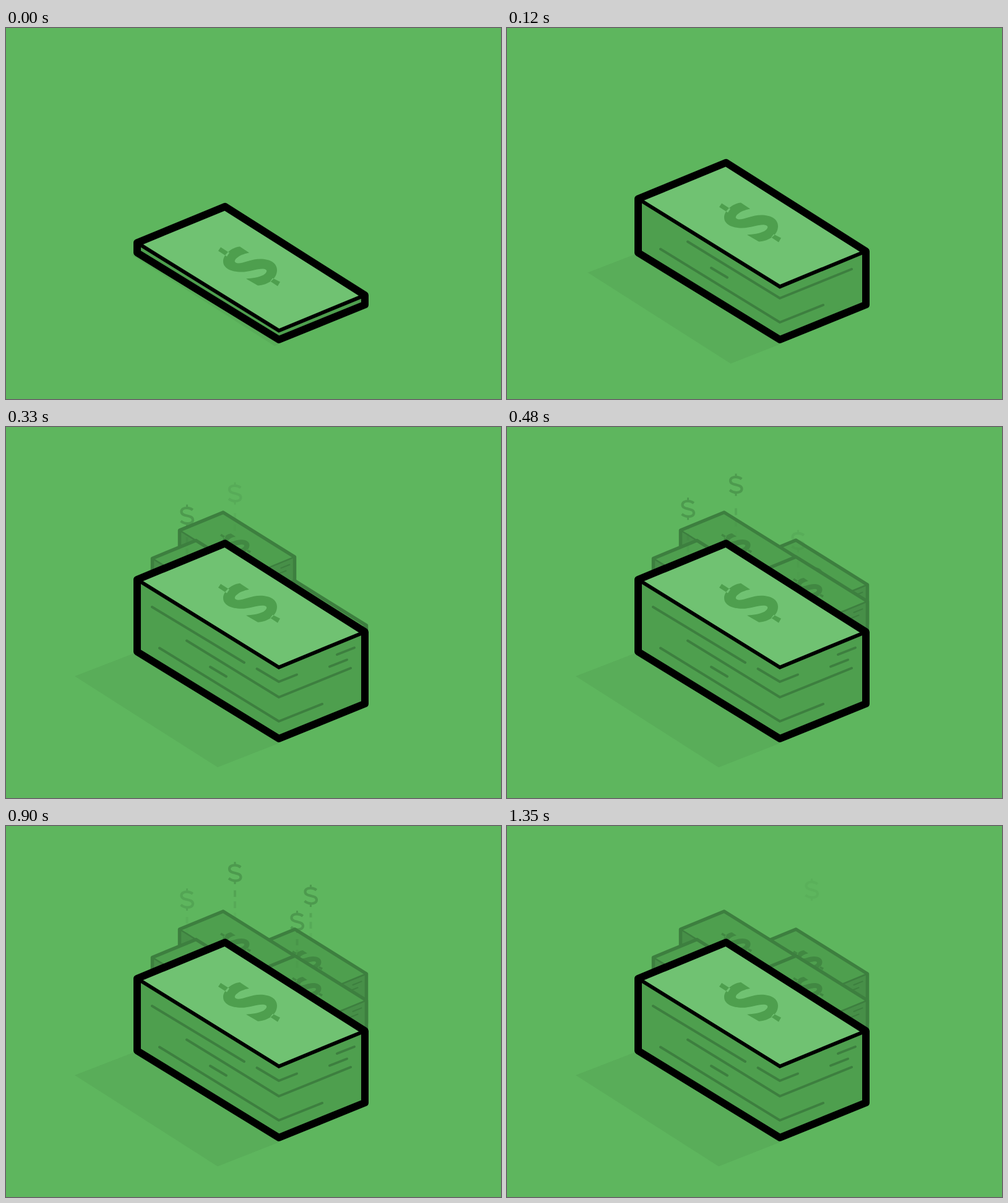
An HTML page for the animation above (2040 ms loop, 800x600 px).

```html
<!DOCTYPE html>
<html lang="en">
<head>
<meta charset="utf-8">
<title>Cash stack</title>
<style>
  html, body { margin: 0; width: 100%; height: 100%; overflow: hidden; background: #5eb65e; }
  svg { display: block; width: 100vw; height: 100vh; }
</style>
</head>
<body>
<svg id="stage" viewBox="0 0 800 600"></svg>
<script>
const LOOP = 2040, STEP = 30, LAST = 1350;
const SIDE = '#4e9f4e', TOP = '#70c272', DARK = '#3d7f3f', DIM_SIDE = '#478f48';
const stage = document.getElementById('stage');

const clamp = x => Math.min(1, Math.max(0, x));
const ramp = (t, a, b) => clamp((t - a) / (b - a));
const easeOut = (t, start, dur, pow) => 1 - Math.pow(1 - ramp(t, start, start + dur), pow);
const pts = list => list.map(p => p.map(n => n.toFixed(2)).join()).join(' ');
const polygon = (list, attrs) => `<polygon points="${pts(list)}" ${attrs}/>`;
const polyline = (list, attrs) => `<polyline points="${pts(list)}" fill="none" ${attrs}/>`;

// Dollar sign lying on the top of a stack
const FLAT = 'M-16-32C-28-31-43-20-43-8C-43 3-30 9-14 9C0 9 14 3 22 4C30 5 28 10 22 14' +
  'C14 18 4 19-6 20L13 31C30 30 44 20 44 6C44-6 32-12 17-12C3-12-10-5-19-5' +
  'C-27-6-25-11-19-15C-14-19-6-21-1-22Z' +
  'M-47-31L-33-22L-37-16L-51-25ZM37 19L49 25L45 32L33 24Z';

// Upright floating dollar sign
const CURVE = 'M9.3-9.3C6.5-11.5 3.5-12.6 0-12.6C-5-12.6-9-10.6-9-6.7C-9-2.2-5-1.2 0 0' +
  'C5 1.2 9.5 2.2 9.5 6.7C9.5 10.6 5.5 12.6 1 12.6C-4 12.6-7 11-10 8.6';
const BARS = 'M0-18V-12M0 12V18';

const flatDollar = (x, y, s, fill) =>
  `<path d="${FLAT}" transform="translate(${x} ${y}) scale(${s})" fill="${fill}"/>`;

// Paper edges on the front stack; each shows from its own moment
const EDGES = [
  [45, [[292, 345.5], [441, 437], [557, 390]]],
  [45, [[248, 357.5], [441, 476], [511, 448]]],
  [45, [[330, 388], [356, 403.5]]],
  [150, [[236, 291], [385, 381]]],
  [150, [[405.5, 391], [441, 412], [470, 400.5]]],
  [150, [[535, 368], [563, 357]]],
  [150, [[523, 387.5], [551, 376.5]]]
];

function shadow(t) {
  const s = 7 + 92 * easeOut(t, 0, 450, 5);
  const x = 441 - s, y = 511.5 + s * 0.393;
  return polygon([[212, 364], [x - 231, y - 147.3], [x, y], [441, 511.5], [441, 500]], 'fill="#59ad59"');
}

function frontStack(t) {
  const h = 116.3 * easeOut(t, -19, 300, 2.2);
  const left = [212, 363 - h], back = [354, 304.5 - h], right = [580, 447.7 - h], front = [441, 505 - h];
  const floor = [[580, 447.5], [441, 504], [212, 363.5]];
  const edges = EDGES.filter(e => t >= e[0]).map(e => polyline(e[1],
    `stroke="${DARK}" stroke-width="4" stroke-linecap="round" stroke-linejoin="round"`)).join('');
  return polygon([left, front, right, ...floor], `fill="${SIDE}"`) + edges +
    polygon([left, back, right, front], `fill="${TOP}"`) +
    flatDollar(394, 488 - h - 84 + 0.3, 1, SIDE).replace(/translate\([^)]*\)/, `translate(394 ${(404.3 - h - 3.2).toFixed(2)})`) +
    polyline([left, front, right], 'stroke="#000" stroke-width="6"') +
    polygon([left, back, right, ...floor], 'fill="none" stroke="#000" stroke-width="12" stroke-linejoin="round"');
}

// Half-size stacks: back corner at rest, full height, start and length of the rise
const STACKS = {
  farRight: [467, 167, 80, 370, 212],
  farLeft: [351, 138, 80, 130, 212],
  nearLeft: [307, 183.5, 58, 120, 180],
  nearRight: [467, 210, 58, 300, 180]
};

function backStack([x, y, full, start, dur], t) {
  if (t <= start) return '';
  const base = y + full;
  const top = base - full * easeOut(t, start, dur, 2.2);
  const corner = (dx, dy, from) => [x + dx, from + dy];
  const back = [x, top], left = corner(-70.5, 29, top);
  const right = corner(115.5, 72, top), front = corner(45, 101, top);
  const floor = [corner(115.5, 72, base), corner(45, 101, base), corner(-70.5, 29, base)];
  const [rx, ry] = right;
  const marks = [[-22, 18], [-28, 28]].map(([dx, dy]) =>
    polyline([[rx + dx, ry + dy], [rx + dx + 14, ry + dy - 5.6]],
      `stroke="${DARK}" stroke-width="2" stroke-linecap="round"`)).join('');
  return polygon([left, front, right, ...floor], `fill="${DIM_SIDE}"`) + marks +
    polygon([left, back, right, front], `fill="${SIDE}"`) +
    flatDollar(x + 20.5, top + 50, 0.5, '#418842') +
    polyline([left, front, right], `stroke="${DARK}" stroke-width="2.6"`) +
    polygon([left, back, right, ...floor], `fill="none" stroke="${DARK}" stroke-width="5.5" stroke-linejoin="round"`);
}

// Floating signs: x, resting y, speed, end of rise, fade in, fade out
const SIGNS = [
  [292.5, 118, 0.0034, 1195, 200, 320, 830, 1010],
  [370, 74.5, 0.0036, 1220, 290, 400, 920, 1080],
  [492.5, 103, 0.0037, 1480, 560, 650, 1080, 1415],
  [470.5, 152, 0.0042, 1240, 440, 570, 920, 1080]
];

function sign([x, rest, speed, end, in0, in1, out0, out1], t) {
  const alpha = ramp(t, in0, in1) * (1 - ramp(t, out0, out1));
  if (alpha <= 0) return '';
  const left = Math.pow(Math.max(0, speed * (end - t)), 3);
  let dashes = '';
  for (let k = -1; k < 3; k++) {
    const start = 46.5 - 0.45 * left + 18.2 * k;
    const a = Math.max(28, start), b = start + 11;
    const fade = 0.7 * clamp(1 - ((a + b) / 2 - 28) / 54) * (1 - ramp(t, out0, out0 + 180));
    if (b - a > 4 && fade > 0) {
      dashes += `<path d="M0 ${a.toFixed(2)}V${b.toFixed(2)}" stroke-width="4" opacity="${fade.toFixed(3)}"/>`;
    }
  }
  return `<g transform="translate(${x} ${(rest + left).toFixed(2)})" opacity="${(0.5 * alpha).toFixed(3)}"
    fill="none" stroke="${DARK}"><path d="${CURVE}" stroke-width="4.2"/><path d="${BARS}" stroke-width="3"/>${dashes}</g>`;
}

function draw(t) {
  const { farRight, farLeft, nearLeft, nearRight } = STACKS;
  stage.innerHTML = '<rect width="800" height="600" fill="#5eb65e"/>' + shadow(t) +
    [farRight, farLeft, nearRight, nearLeft].map(s => backStack(s, t)).join('') +
    SIGNS.map(s => sign(s, t)).join('') + frontStack(t);
}

const begin = performance.now();
let shown = -1;
function tick() {
  const time = Math.max(0, performance.now() - begin) % LOOP;
  const t = Math.min(LAST, Math.floor(time / STEP) * STEP);
  if (t !== shown) draw(shown = t);
  requestAnimationFrame(tick);
}
tick();
</script>
</body>
</html>
```
